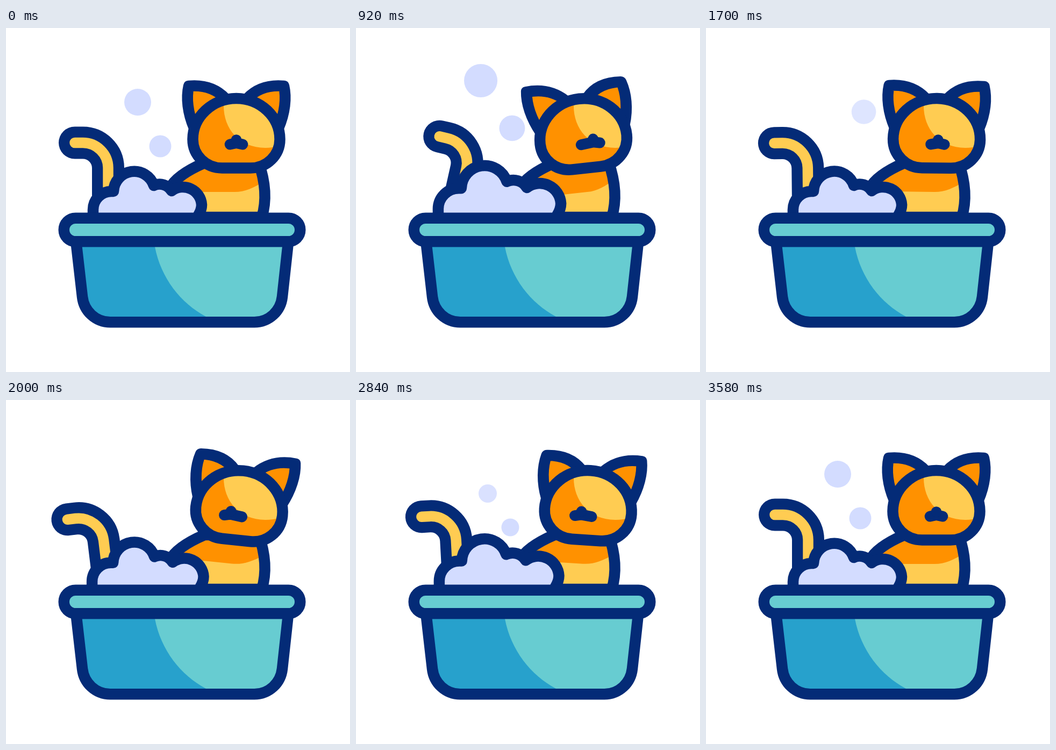
Recreate the animation shown at these times as an HTML page with a canvas. Size 640 px wide and 640 px high, loop 3.6 s.

```html
<!DOCTYPE html>
<html lang="en">
<head>
<meta charset="utf-8">
<title>Cat bath</title>
<style>
  html, body { margin: 0; width: 100%; height: 100%; overflow: hidden; background: #fff; }
  canvas { display: block; width: 640px; height: 640px; }
</style>
</head>
<body>
<canvas id="stage" width="640" height="640"></canvas>
<script>
const ctx = document.getElementById('stage').getContext('2d');
const LOOP = 3600, SWING = 760, LINE = 20.5;
const NAVY = '#042b77', ORANGE = '#ff9100', YELLOW = '#ffcc52';
const TEAL = '#67ccd1', BLUE = '#27a1cc', LILAC = '#d3dcff';
const NECK = { x: 428.5, y: 257 };
const TAIL_ROOT = { x: 194, y: 330 };
const FOAM_BASE = { x: 232, y: 349 };
const EAR_BASE = 180;

const shape = d => new Path2D(d);
const tail = shape('M128 213.5H143A47 47 0 0 1 190 260V315');
const body = shape('M305 298C313 282 332 267 369 251L470 250C484 290 484 325 476 352H305Z');
const bodyShade = shape('M290 305H425C445 305 460 298 482 284V220H290Z');
const head = shape('M428.5 131C384 131 347.5 165 347.5 207C347.5 237 372 260.5 402 260.5H455C485 260.5 509.5 237 509.5 207C509.5 165 473 131 428.5 131Z');
const headLight = shape('M405 100V145C405 195 445 236 512 219L540 210V100Z');
const ear = shape('M350 186C338 158 335 130 340 108C362 106 388 110 408 131');
const foam = shape('M162 362V338A34 34 0 0 1 196 304H200A38.5 38.5 0 0 1 275 293A26 26 0 0 1 308 303A35 35 0 0 1 364 329Q364 338 358 348V362Z');
const tub = shape('M130 395L142 500C145 527 167 547.3 194 547.3H462C489 547.3 511 527 514 500L525.5 395Z');
const tubLight = shape('M275 395L277 407C288 465 325 512 372 537L392 547H540V395Z');
const rim = shape('M129.5 353.7H525.5A21.8 21.8 0 0 1 525.5 397.3H129.5A21.8 21.8 0 0 1 129.5 353.7Z');

// Speeds are per second; "emerge" and "swell" hold while the bubble leaves the foam.
const bubbles = [
  { x: 245, y: 138, r: 25, drift: -15, rise: 46.5, emerge: 48.6, grow: 7, swell: 10.8, born: -.95, pop: 1.18 },
  { x: 287, y: 220, r: 20.5, drift: 4, rise: 39, emerge: 23, grow: 4, swell: 5.4, born: -1, pop: 1.58 }
];

const clamp = u => Math.min(1, Math.max(0, u));
const ease = u => 1 - (1 - clamp(u) ** 1.2) ** 3;

// Rest to 1, across to -back, then home; a lag makes one part follow another.
function swing(t, back, lag = 0) {
  const move = start => ease((t - start - lag) / SWING);
  return move(30) - (1 + back) * move(1420) + back * move(2600);
}

function fill(path, color) {
  ctx.fillStyle = color;
  ctx.fill(path);
}

function stroke(path, width = LINE, color = NAVY) {
  ctx.lineWidth = width;
  ctx.strokeStyle = color;
  ctx.stroke(path);
}

function disc(x, y, r, color) {
  ctx.fillStyle = color;
  ctx.beginPath();
  ctx.arc(x, y, r, 0, 2 * Math.PI);
  ctx.fill();
}

function isolated(draw) {
  ctx.save();
  draw();
  ctx.restore();
}

function turn(pivot, degrees) {
  ctx.translate(pivot.x, pivot.y);
  ctx.rotate(degrees * Math.PI / 180);
  ctx.translate(-pivot.x, -pivot.y);
}

function drawTail(t) {
  isolated(() => {
    turn(TAIL_ROOT, 12.7 * swing(t, .58));
    stroke(tail, 60);
    stroke(tail, 19.5, YELLOW);
  });
}

function drawBody(angle) {
  isolated(() => {
    ctx.clip(body);
    fill(body, YELLOW);
    turn(NECK, angle);
    fill(bodyShade, ORANGE);
  });
  stroke(body);
}

// The ears lean sideways from their base, opposite to the gaze.
function drawEars(look) {
  const lean = .1 * look;
  for (const side of [1, -1]) {
    isolated(() => {
      ctx.transform(1, 0, lean, 1, -lean * EAR_BASE, 0);
      ctx.translate(NECK.x, 0);
      ctx.scale(side, 1);
      ctx.translate(-NECK.x, 0);
      fill(ear, ORANGE);
      stroke(ear);
    });
  }
}

// The muzzle side that trails the gaze stretches behind the nose.
function drawMuzzle(look) {
  const lead = look * 18, trail = look * 6.5;
  const left = NECK.x - 11.8 + (look > 0 ? trail : lead);
  const right = NECK.x + 11.8 + (look > 0 ? lead : trail);
  const nose = NECK.x + lead;
  const mouth = new Path2D();
  mouth.moveTo(left, 216.5);
  mouth.lineTo(nose, 214);
  mouth.lineTo(right, 216.5);
  stroke(mouth, 20);
  disc(nose, 208, 9.8, NAVY);
}

function drawHead(angle, look) {
  isolated(() => {
    turn(NECK, angle);
    drawEars(look);
    fill(head, ORANGE);
    isolated(() => {
      ctx.clip(head);
      ctx.setTransform(1, 0, 0, 1, 0, 0);
      fill(headLight, YELLOW);
    });
    stroke(head);
    drawMuzzle(look);
  });
}

function drawFoam(t) {
  const phase = clamp((t - 80) / 3340) * 2 * Math.PI;
  const s = 1 + .13 * Math.sin(phase) ** 2;
  const swollen = new Path2D();
  swollen.addPath(foam, new DOMMatrix([s, 0, 0, s, FOAM_BASE.x * (1 - s), FOAM_BASE.y * (1 - s)]));
  fill(swollen, LILAC);
  stroke(swollen);
}

function drawTub() {
  isolated(() => {
    ctx.clip(tub);
    fill(tub, BLUE);
    fill(tubLight, TEAL);
  });
  stroke(tub);
  fill(rim, TEAL);
  stroke(rim);
}

function drawBubbles(t) {
  // Age is negative while a bubble grows towards the next loop.
  const age = t > 2200 ? Math.min(0, t - 3580) / 1000 : Math.max(0, t - 60) / 1000;
  for (const b of bubbles) {
    const popped = clamp((age - b.pop) / .24);
    const radius = b.r + age * (age < 0 ? b.swell : b.grow);
    isolated(() => {
      ctx.globalAlpha = clamp((age - b.born) / .25) * (1 - popped);
      disc(b.x + b.drift * Math.max(0, age),
        b.y - age * (age < 0 ? b.emerge : b.rise),
        radius * (1 - .62 * popped), LILAC);
    });
  }
}

function render(t) {
  const angle = -6.2 * swing(t, 1.06, 60);
  ctx.fillStyle = '#fff';
  ctx.fillRect(0, 0, 640, 640);
  ctx.lineCap = ctx.lineJoin = 'round';
  drawTail(t);
  drawBody(angle);
  drawFoam(t);
  drawTub();
  drawHead(angle, swing(t, 1, 110));
  drawBubbles(t);
}

const start = performance.now();
function tick() {
  render((performance.now() - start) % LOOP);
  requestAnimationFrame(tick);
}
tick();
</script>
</body>
</html>
```
